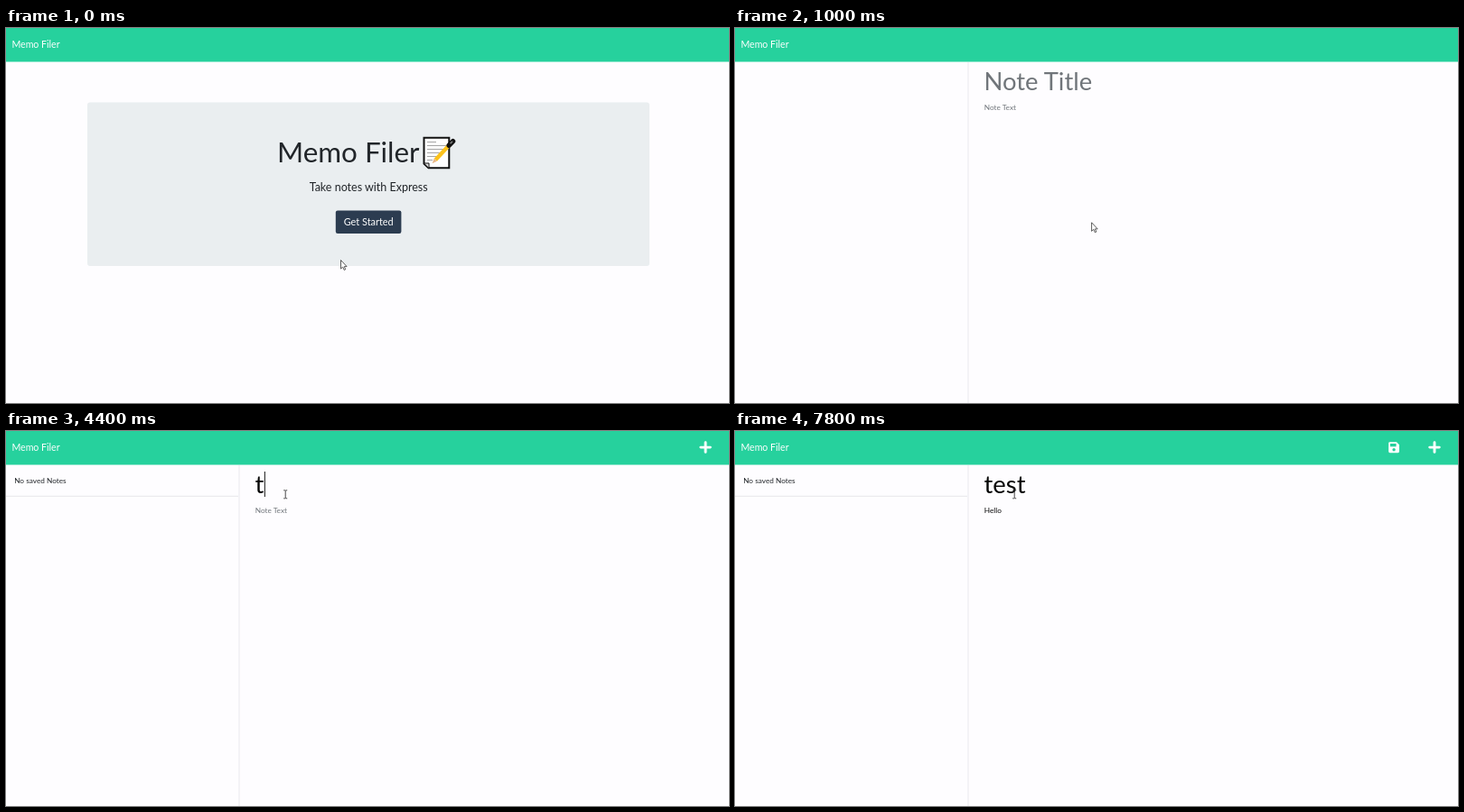
These frames come from a looping animation (800x416 px, 8 s). An HTML page:

```html
<!DOCTYPE html>
<html lang="en">
<head>
<meta charset="utf-8">
<title>Memo Filer</title>
<style>
  html, body { margin: 0; width: 100%; height: 100%; overflow: hidden; background: #fefdff; }
  svg { display: block; width: 800px; height: 416px; font-family: Lato, sans-serif; }
  .small { font-size: 8.25px; }
  .title { font-size: 27.4px; }
</style>
</head>
<body>
<svg viewBox="0 0 800 416">
  <rect width="800" height="416" fill="#fefdff"/>
  <rect width="800" height="37.5" fill="#26d19d"/>
  <text x="6.4" y="21.6" font-size="10.6" fill="#fff">Memo Filer</text>

  <g id="home" fill="#212529">
    <rect x="90" y="82.4" width="622" height="181.6" rx="3" fill="#eaeef0"/>
    <text x="300" y="149" font-size="31.4">Memo Filer</text>
    <g id="memo">
      <path d="M462.5 121.8H490.3V155.2H467.5L462.5 150.5Z" fill="#fff" stroke="#111" stroke-width="2"/>
      <path d="M466 126.5h10M466 130.5h21M466 134.5h18M466 138.5h15M466 142.5h12M466 146.5h6" stroke="#a5a5a5"/>
      <path d="M463 150h5v5" fill="#ddd" stroke="#111"/>
      <path d="M475.3 146.2L491.5 128.8" stroke="#fcc21b" stroke-width="4.4"/>
      <path d="M471.6 150.2L473.6 144.7L476.9 147.8Z" fill="#e8b98a"/>
      <path d="M490.2 130.2L494.6 125.6" stroke="#111" stroke-width="5.4" stroke-linecap="round"/>
      <path d="M491.6 128.2L494 125.8" stroke="#888" stroke-width="1.6"/>
    </g>
    <text x="401.2" y="181.3" font-size="12.5" text-anchor="middle">Take notes with Express</text>
    <rect id="ring" x="363.3" y="200.9" width="75.6" height="28.6" rx="3.5" fill="#a0a7b0"/>
    <rect id="button" x="364.8" y="202.4" width="72.6" height="25.6" rx="2.2"/>
    <text x="401.2" y="219" font-size="10.9" fill="#fff" text-anchor="middle">Get Started</text>
  </g>

  <g id="notes">
    <path d="M258 38V416" stroke="#e9e9ee"/>
    <g id="loaded">
      <path d="M0 72.3H257" stroke="#e6e6ea"/>
      <text class="small" x="9.2" y="58.3" fill="#212529">No saved Notes</text>
      <path d="M774 12.8V23.4M768.7 18.1H779.3" stroke="#fff" stroke-width="2.9" stroke-linecap="round"/>
    </g>
    <g id="save">
      <path d="M724.5 12.2H732L735 15.2V22.8Q735 24.2 733.6 24.2H724.6Q723.2 24.2 723.2 22.8V13.6Q723.2 12.2 724.6 12.2Z" fill="#fff"/>
      <rect x="725" y="14" width="6.6" height="3.3" fill="#26d19d"/>
      <circle cx="729.1" cy="20.7" r="1.7" fill="#26d19d"/>
    </g>
    <text id="title" class="title" x="275.6" y="68.8"></text>
    <text id="body" class="small" x="275.8" y="90.6"></text>
    <rect id="caret" width="1" fill="#111"/>
  </g>

  <path id="arrow" d="M0 0V9.6L2.2 7.6L3.7 11L5.2 10.3L3.8 7.1H6.6Z" fill="#fff" stroke="#333" stroke-width=".8"/>
  <path id="beam" d="M-2 -4.5H-.6L0 -4L.6 -4.5H2M0 -4V4M-2 4.5H-.6L0 4L.6 4.5H2" fill="none" stroke="#333" stroke-width=".9"/>
</svg>
<script>
const $ = id => document.getElementById(id);
const show = (id, on) => $(id).style.display = on ? "" : "none";
const within = (t, spans) => spans.some(([a, b]) => t >= a && t < b);

// Pointer stops: time, x, y
const stops = [
  [0, 370.5, 257.5], [700, 394.6, 215.8], [1500, 394.6, 215.8], [1900, 290, 84],
  [2000, 290, 84], [2200, 291.5, 81], [2500, 301, 75.5], [3500, 301, 75.5],
  [3800, 309.2, 70.3], [8000, 309.2, 70.3]
];
const titleKeys = [4400, 4600, 4700, 4900];
const bodyKeys = [6300, 6400, 6500, 6600, 6800];
const caretOn = [[2400, 2900], [3400, 3800], [4200, 5500], [6000, 7200]];

function pointer(t) {
  const i = stops.findIndex(s => s[0] > t);
  const [t0, x0, y0] = stops[i - 1], [t1, x1, y1] = stops[i];
  const k = (t - t0) / (t1 - t0);
  return [x0 + (x1 - x0) * k, y0 + (y1 - y0) * k];
}

function type(id, word, hint, keys, t) {
  const el = $(id), typed = word.slice(0, keys.filter(k => t >= k).length);
  el.textContent = typed || hint;
  el.setAttribute("fill", typed ? "#080808" : "#70757a");
  return typed ? el.getComputedTextLength() : 0;
}

function draw(now) {
  const t = Math.floor(now % 8000 / 100) * 100;
  const [x, y] = pointer(t), home = t < 1000, beam = !home && y < 120;
  show("home", home);
  show("notes", !home);
  show("loaded", t >= 1100);
  show("save", t >= bodyKeys[0]);

  show("ring", t >= 800);
  $("button").setAttribute("fill", y < 228 ? "#1c2938" : "#2c3c50");

  const titleWidth = type("title", "test", "Note Title", titleKeys, t);
  const bodyWidth = type("body", "Hello", "Note Text", bodyKeys, t);
  const inBody = t >= 5200, caret = $("caret");
  show("caret", within(t, caretOn));
  caret.setAttribute("x", 276 + (inBody ? bodyWidth : titleWidth));
  caret.setAttribute("y", inBody ? 82.5 : 45);
  caret.setAttribute("height", inBody ? 10 : 28);

  show("arrow", !beam);
  show("beam", beam);
  $(beam ? "beam" : "arrow").setAttribute("transform", `translate(${x} ${y})`);
  requestAnimationFrame(draw);
}
requestAnimationFrame(draw);
</script>
</body>
</html>
```
